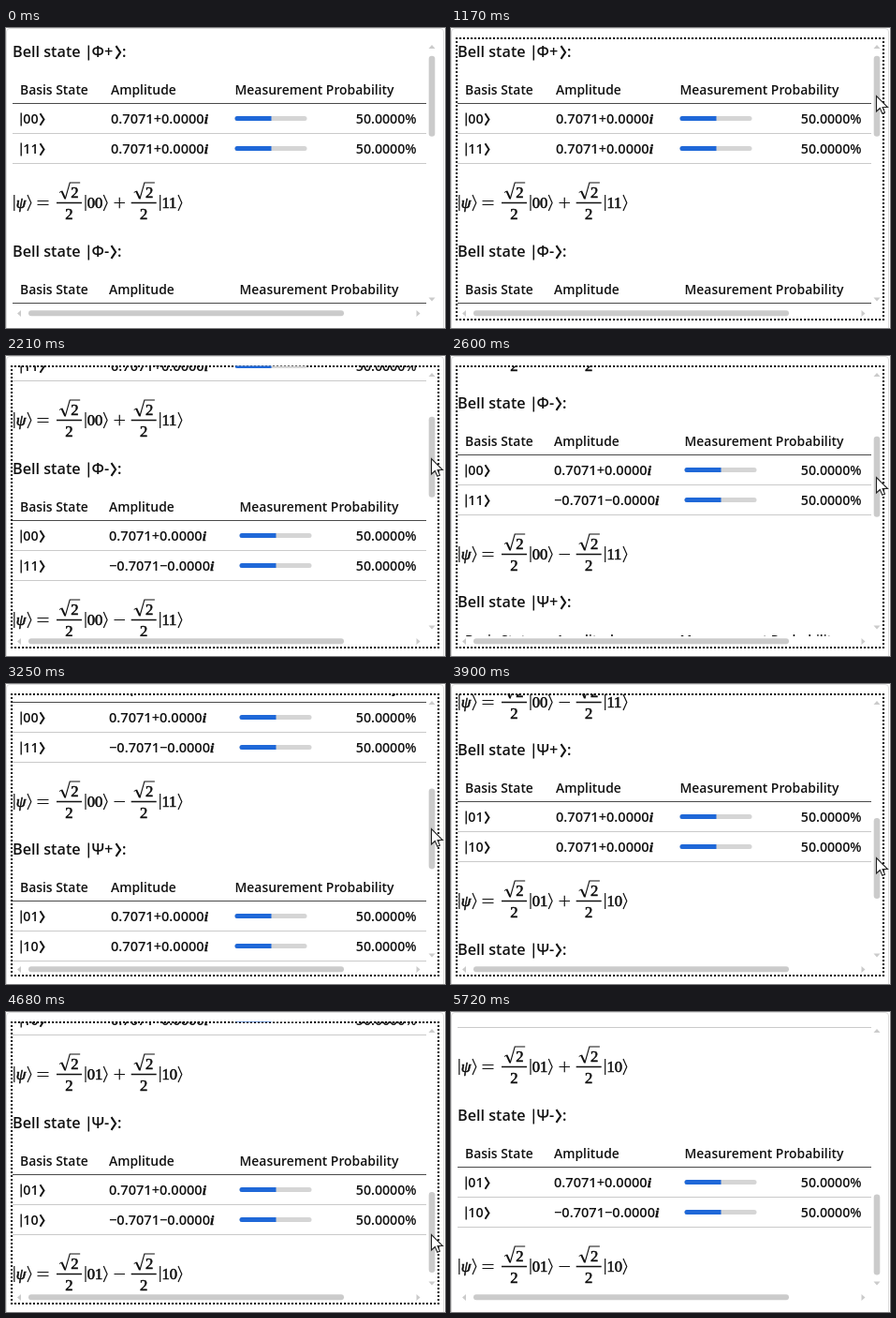
Animation of 469x320 px, one loop 5850 ms. Source, as an HTML page:

```html
<!DOCTYPE html>
<html lang="en">
<head>
<meta charset="utf-8">
<title>Bell states</title>
<style>
  html, body { margin: 0; width: 100%; height: 100%; overflow: hidden; background: #fff; }
  svg { position: absolute; left: 0; top: 0; width: 469px; height: 320px; }
  #focus { position: absolute; left: 5px; top: 10px; width: 458px; height: 302px; box-sizing: border-box; border: 2px dotted #000; }
  text { fill: #111; white-space: pre; }
  .ui { font: 600 13.9px "Open Sans", "Noto Sans", sans-serif; }
  .num { font-size: 14.2px; }
  .amp { font-size: 14.6px; }
  .title { font-size: 16.2px; }
  .imag { font: italic bold 15.5px "Liberation Serif", serif; stroke: #111; stroke-width: .3px; }
  .math { font: 16.6px "Liberation Serif", serif; stroke: #111; stroke-width: .6px; }
  .psi { font-style: italic; font-size: 17px; }
  .line { fill: none; stroke: #111; }
</style>
</head>
<body>
<div id="focus"></div>
<svg viewBox="0 0 469 320">
  <defs><clipPath id="view"><rect x="6" y="10.5" width="444" height="288.5"/></clipPath></defs>
  <path d="M.5 320V4Q.5 .5 4 .5H464Q467.5 .5 467.5 4V320" fill="none" stroke="#dcdcdc"/>
  <g clip-path="url(#view)"><g id="content"></g></g>
  <g fill="#cbcbcb">
    <rect x="24" y="301.3" width="337" height="6" rx="3"/>
    <rect id="thumb" x="451.7" y="30" width="6.6" height="86" rx="3.3"/>
    <path d="M451.5 22h7l-3.5-4zM451.5 287.5h7l-3.5 4zM16 301v7l-4-3.5zM438.5 301v7l4-3.5z"/>
  </g>
  <path id="cursor" d="M0 0V16.5L3.8 13 6.3 18.8 9 17.6 6.6 12H12Z" fill="#fff" stroke="#222" stroke-width="1.1"/>
</svg>
<script>
const LOOP = 5850, STEP = 130;
const $ = id => document.getElementById(id);

const text = (x, y, s, cls = 'ui', extra = '') => `<text x="${x}" y="${y}" class="${cls}" ${extra}>${s}</text>`;
const path = (d, w = 1) => `<path class="line" d="${d}" stroke-width="${w}"/>`;
const rule = (y, color) => `<path d="M7 ${y}H449" stroke="${color}"/>`;
const angle = (x, y, w, h, weight) => path(`M${x} ${y - h}l${w} ${h}l${-w} ${h}`, weight);

function row(y, bits, amp, x, barX) {
  const top = y - 3;
  return path(`M16.2 ${y - 6.5}v14`, 1.4) + text(18.3, y + 5, bits, 'ui num') +
    angle(36.5, y + .5, 4, 6.2, 2) +
    text(x, y + 5, `${amp}<tspan class="imag">i</tspan>`, 'ui amp') +
    `<rect x="${barX - .5}" y="${top}" width="77" height="5" rx="2.5" fill="#d5d5d5"/>` +
    `<path d="M${barX + 38.5} ${top}h-36.5a2.5 2.5 0 0 0 0 5h36.5z" fill="#1f68d8"/>` +
    text(438.5, y + 5, '50.0000%', 'ui num', 'text-anchor="end"') +
    rule(y + 15.5, '#cacaca');
}

// Coefficient and basis ket, placed from the left end of the fraction bar
function term(x, bits) {
  return path(`M${x} 186.5h27`, 1.3) +
    path(`M${x + 3} 175.5l2.5-1.5`, 1) + path(`M${x + 5.5} 174l3.7 8`, 1.9) +
    path(`M${x + 9.2} 182.5l5-17.5h11`, 1.1) +
    text(x + 15.2, 181, 2, 'math') + text(x + 9.2, 203.5, 2, 'math') +
    path(`M${x + 31} 178v17`, 1.2) + text(x + 32.7, 192, bits, 'math') +
    angle(x + 50.3, 186.5, 3.8, 8.5, 1.2);
}

function formula(bits, sign) {
  return path('M8.8 178v17', 1.2) + text(10.8, 192, 'ψ', 'math psi') +
    angle(23, 186.5, 3.8, 8.5, 1.2) + path('M33.5 184.5h12M33.5 188.5h12', 1.2) +
    term(54, bits[0]) + path('M115.5 186.5h11.5' + (sign > 0 ? 'M121.25 180.7v11.6' : ''), 1.2) +
    term(133.7, bits[1]);
}

function state(y, letter, sign, bits) {
  const plus = sign > 0, x = plus ? 112 : 110, barX = plus ? 245 : 250, end = plus ? 117.5 : 112.5;
  return `<g transform="translate(0 ${y})">` +
    text(7, 31, 'Bell state', 'ui title') + path('M88.3 18.5v16', 1.5) +
    text(91.5, 31, letter + (plus ? '+' : '-'), 'ui title') +
    angle(end, 26, 4.6, 6.8, 2.1) + text(end + 6.5, 31, ':', 'ui title') +
    text(15, 70.5, 'Basis State') + text(x, 70.5, 'Amplitude') + text(barX - .5, 70.5, 'Measurement Probability') +
    rule(80.5, '#4a4a4a') +
    row(97, bits[0], '0.7071+0.0000', x, barX) +
    row(129, bits[1], plus ? '0.7071+0.0000' : '−0.7071−0.0000', x, barX) +
    formula(bits, sign) + '</g>';
}

$('content').innerHTML =
  state(0, 'Φ', 1, ['00', '11']) + state(213, 'Φ', -1, ['00', '11']) +
  state(425, 'Ψ', 1, ['01', '10']) + state(638, 'Ψ', -1, ['01', '10']);

// time, scroll, pointer x, pointer y
const keys = [
  [520, 0, 466, 116], [1040, 0, 455, 73], [1170, 0, 455, 73], [1820, 48, 455, 90],
  [2600, 188, 455, 130], [2990, 253, 455, 149], [3120, 253, 455, 149], [3900, 380, 455, 186],
  [4290, 479, 455, 217], [4420, 479, 455, 217], [4680, 545, 455, 238], [4810, 545, 455, 238],
  [4940, 553, 456, 242]
];

function pose(t) {
  if (t <= keys[0][0]) return keys[0];
  const i = keys.findIndex(k => k[0] >= t);
  if (i < 0) return keys[keys.length - 1];
  const a = keys[i - 1], b = keys[i], p = (t - a[0]) / (b[0] - a[0]);
  return a.map((v, n) => v + (b[n] - v) * p);
}

const show = (id, on) => $(id).style.visibility = on ? 'visible' : 'hidden';

function draw(ms) {
  const t = Math.floor(ms % LOOP / STEP) * STEP;
  const [, scroll, x, y] = pose(t);
  $('content').setAttribute('transform', `translate(0 ${-Math.round(scroll)})`);
  $('thumb').setAttribute('y', 29.7 + scroll * .298);
  $('cursor').setAttribute('transform', `translate(${Math.round(x) - .5} ${Math.round(y) - .5})`);
  show('focus', t >= 1170 && t < 5720);
  show('cursor', t >= 520 && t < 5070);
}

const start = performance.now();
function tick() {
  draw(performance.now() - start);
  requestAnimationFrame(tick);
}
tick();
</script>
</body>
</html>
```
